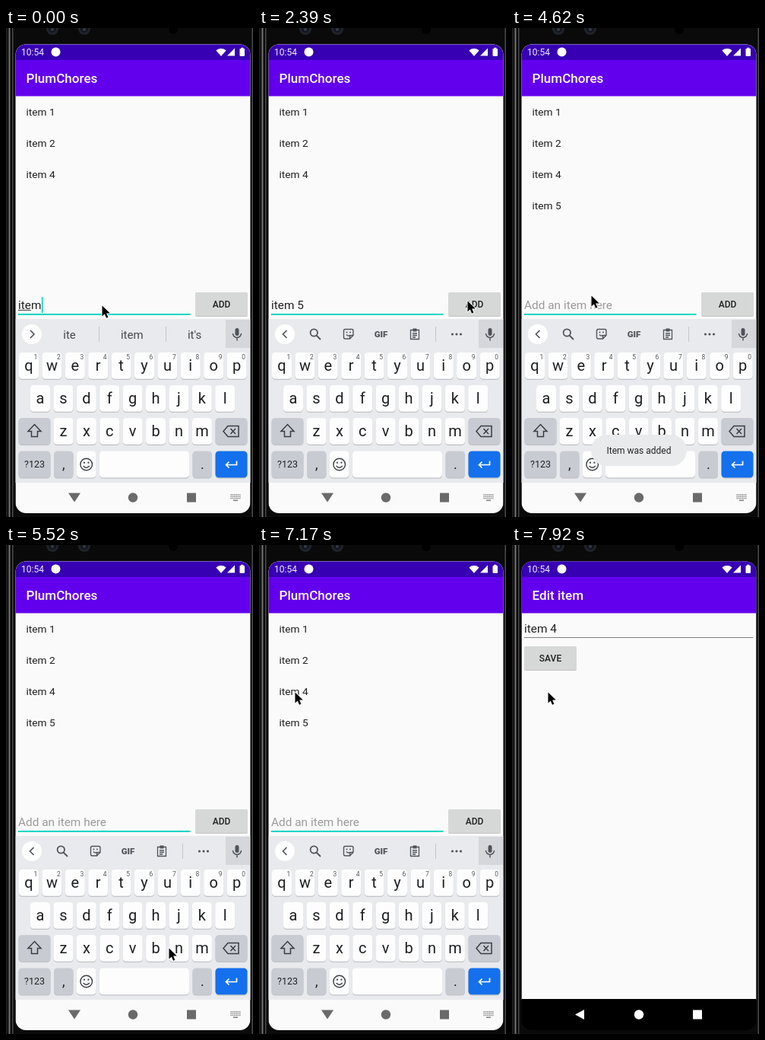
Animation of 325 by 642 pixels, one loop 8 s. Source, as an HTML page with a canvas:

```html
<!DOCTYPE html>
<html lang="en">
<head>
<meta charset="utf-8">
<title>To-do app demo</title>
<style>
html, body { margin: 0; width: 100%; height: 100%; overflow: hidden; background: #0a0a0a; }
canvas { display: block; width: 325px; height: 642px; }
</style>
</head>
<body>
<canvas id="stage"></canvas>
<script>
const W = 325, H = 642, LOOP = 8000;
const dpr = window.devicePixelRatio || 1;
const PURPLE = '#6200ee', DEEP = '#3700b3', PAPER = '#fafafa', TEAL = '#03d5c1', INK = '#212121', ICON = '#50545a';
const LEFT = 12.5, WIDE = 309;

function makeLayer(canvas) {
  canvas.width = W * dpr;
  canvas.height = H * dpr;
  const c = canvas.getContext('2d');
  c.scale(dpr, dpr);
  return c;
}
const screen = makeLayer(document.getElementById('stage'));
const layer = makeLayer(document.createElement('canvas'));
let g = screen;

// Pointer path: time, x, y
const PATH = [
  [1800, 126, 364], [1950, 134, 368], [2100, 190, 370], [2250, 252, 364], [2390, 274, 358],
  [2980, 274, 358], [3130, 268, 400], [3280, 244, 490], [3430, 216, 560], [3580, 202, 586],
  [3880, 200, 589], [4030, 190, 582], [4180, 172, 540], [4330, 142, 455], [4480, 116, 380],
  [4620, 104, 351], [4770, 104, 353], [4920, 112, 372], [5070, 140, 430], [5220, 176, 490],
  [5370, 206, 524], [5520, 214, 529], [5670, 214, 480], [5820, 214, 381], [5970, 219, 300],
  [6120, 150, 190], [6270, 62, 125], [6420, 20, 115], [6570, 8, 140], [6720, 24, 175],
  [6870, 44, 191], [7170, 47, 193]
];

function pointerAt(t) {
  const i = PATH.findIndex(p => p[0] > t);
  if (i === 0) return PATH[0].slice(1);
  if (i < 0) return PATH[PATH.length - 1].slice(1);
  const [t0, x0, y0] = PATH[i - 1], [t1, x1, y1] = PATH[i];
  const k = (t - t0) / (t1 - t0);
  return [x0 + (x1 - x0) * k, y0 + (y1 - y0) * k];
}

function snap(t) {
  const base = t < 2390 ? 0 : t < 2680 ? 2390 : t < 4620 ? 2680 : 4620;
  return base + Math.floor((t - base) / 150) * 150;
}

function rect(x, y, w, h, color) {
  g.fillStyle = color;
  g.fillRect(x, y, w, h);
}
function round(x, y, w, h, r, color) {
  g.fillStyle = color;
  g.beginPath();
  g.roundRect(x, y, w, h, r);
  g.fill();
}
function disc(x, y, r, color) {
  g.fillStyle = color;
  g.beginPath();
  g.arc(x, y, r, 0, 7);
  g.fill();
}
function poly(points, color) {
  g.fillStyle = color;
  g.beginPath();
  points.forEach(([x, y]) => g.lineTo(x, y));
  g.closePath();
  g.fill();
}
function stroke(path, color, width = 1.5) {
  g.strokeStyle = color;
  g.lineWidth = width;
  g.stroke(new Path2D(path));
}
// y is the middle of the capital letters
function text(s, x, y, size, color = INK, align = 'left', weight = 400) {
  g.font = `${weight} ${size}px Roboto, sans-serif`;
  g.textAlign = align;
  g.fillStyle = color;
  g.fillText(s, x, y + size * 0.355);
}
function button(label, x, y, color = '#d6d7d7') {
  round(x, y + 1, 69, 31, 2, '#c4c4c4');
  round(x, y, 69, 31, 2, color);
  text(label, x + 34.5, y + 15.5, 12, INK, 'center', 500);
}
function appBar(title) {
  rect(LEFT, 21, WIDE, 576, PAPER);
  rect(LEFT, 42, WIDE, 47.5, PURPLE);
  rect(LEFT, 21, WIDE, 21, DEEP);
  text(title, 26.5, 66, 17.1, '#fff', 'left', 500);
}

function drawMain(t, shift) {
  appBar('PlumChores');
  const items = ['item 1', 'item 2', 'item 4'];
  if (t >= 2830) items.push('item 5');
  items.forEach((s, i) => text(s, 26.5, 110.5 + 41 * i, 13.7));

  g.save();
  g.translate(0, shift);
  const typed = t < 150 ? 'item' : t < 1650 ? 'item ' : t < 2830 ? 'item 5' : '';
  if (typed) text(typed, 16, 364, 15.4);
  else text('Add an item here', 16, 364, 15.4, '#9a9a9a');
  if (t < 150) rect(16, 370, g.measureText('ite').width, 1, '#444');
  const caret = t < 2390
    ? !(t >= 900 && t < 1350) && t < 2250
    : t < 7620 && (t + 850) % 1000 >= 500;
  if (caret) rect(16.5 + g.measureText(typed).width, 353, 1.6, 21, TEAL);
  rect(16, 375, 226.5, 2, TEAL);
  button('ADD', 249, 347, t >= 2680 && t < 2980 ? '#bfc0c0' : undefined);
  g.restore();
}

function drawEdit() {
  appBar('Edit item');
  text('item 4', 16, 109.5, 15.4);
  rect(16, 121, 301, 1, '#808080');
  button('SAVE', 16, 133);
  rect(LEFT, 596, WIDE, 46, '#000');
}

function key(x, y, w, label = '', color = '#fdfdfd', size = 20) {
  round(x, y + 1, w, 35, 4.5, '#bfc2c7');
  round(x, y, w, 34.8, 4.5, color);
  if (label) text(label, x + w / 2, y + 17, size, '#1e1f21', 'center');
}

function drawStrip(t) {
  const tools = t >= 1950;
  rect(289, 383, 32, 37, '#d5d7db');
  round(301.5, 394, 5, 10, 2.5, ICON);
  stroke('M298.5 401a5.5 5.5 0 0 0 11 0M304 406.5v4', ICON);
  disc(34, 402, 13, '#fff');
  stroke(tools ? 'M36.5 397l-5 5 5 5' : 'M32 397l5 5-5 5', ICON, 1.7);
  if (!tools) {
    const words = t < 300 ? ['ite', 'item', "it's"] : ['is', 'in', 'number'];
    words.forEach((s, i) => text(s, 83.5 + 82.3 * i, 402.5, 15, '#44474b', 'center'));
    rect(122, 392, 1, 20, '#c4c7cb');
    rect(210, 392, 1, 20, '#c4c7cb');
    return;
  }
  stroke('M77 400a4.7 4.7 0 1 1-9.4 0 4.7 4.7 0 0 1 9.4 0M76 404l5 5', ICON, 1.8);
  stroke('M113.500 395.500h8.500q2 0 2 2v6l-4.500 4.500h-6q-2 0-2-2v-8.500q0-2 2-2zM119.500 408v-2.500q0-2 2-2h2.500M115 402.500q2.500 3 4.500 .500', ICON, 1.4);
  disc(115.5, 399.5, 1, ICON);
  disc(120, 399.5, 1, ICON);
  text('GIF', 160.5, 402, 11.5, ICON, 'center', 800);
  stroke('M199.500 396.500h11v12h-11zM202 401h6M202 403.500h6M202 406h4', ICON, 1.3);
  rect(202.5, 394.5, 5, 4, ICON);
  rect(232, 392, 1, 20, '#c4c7cb');
  for (const x of [254.5, 260, 265.5]) disc(x, 402, 1.6, ICON);
}

function drawKeyboard(t) {
  rect(LEFT, 382, WIDE, 215, '#e8eaed');
  drawStrip(t);
  const grey = '#c8ccd2', dark = '#3a3d42', pitch = 30.4;
  const row = (letters, x, y) => [...letters].forEach((c, i) => key(x + pitch * i, y, 26, c));
  row('qwertyuiop', 17, 426);
  for (let i = 0; i < 10; i++) text((i + 1) % 10, 39 + pitch * i, 432, 8.5, '#55585c', 'center');
  row('asdfghjkl', 32, 469);
  row('zxcvbnm', 62.5, 512);

  key(16.5, 512, 42, '', grey);
  stroke('M37.500 520.500l8.500 9h-4.500v7h-8v-7h-4.500z', dark);
  key(275.5, 512, 42, '', grey);
  stroke('M292 522.500h14v14h-14l-6-7zM295.500 526l6.500 7m0-7l-6.500 7', dark);

  key(16.5, 555.5, 42, '?123', grey, 12.5);
  key(63, 555.5, 25.5, ',', grey, 18);
  key(93, 555.5, 25.5);
  stroke('M113.500 573a7.800 7.800 0 1 1-15.600 0 7.800 7.800 0 0 1 15.600 0M101.700 575q4 4.500 8 0', dark, 1.4);
  disc(103, 570.7, 1.1, dark);
  disc(108.4, 570.7, 1.1, dark);
  key(123, 555.5, 118);
  key(245.5, 555.5, 25.5, '.', grey, 18);
  key(275.5, 555.5, 42, '', '#1470ec');
  stroke('M303.500 568.500v5h-14m4-4l-4 4 4 4', '#fff', 1.7);
}

function drawNav(t) {
  const open = t < 7620, done = t >= 7770;
  const color = done ? '#fff' : open ? '#6a6a6a' : '#8b8b8b';
  poly(done ? [[83, 616.5], [95, 610], [95, 623]] : [[82, 610.5], [98, 610.5], [90, 622.5]], color);
  disc(167, 616.5, 6.2, color);
  rect(238, 610.5, 12, 12, color);
  if (!open) return;
  for (let r = 0; r < 3; r++)
    for (let c = 0; c < 6; c++) rect(295.5 + c * 2.3, 612 + r * 2.4, 1.4, 1.4, '#7a7a7a');
  rect(299, 619.5, 6, 1.4, '#7a7a7a');
}

function drawStatus() {
  text('10:54', 20, 31.5, 12, '#f1ecfb');
  disc(65.5, 31.5, 6, '#fff');
  g.fillStyle = '#fff';
  g.beginPath();
  g.moveTo(283, 37);
  g.arc(283, 37, 10, -Math.PI * 0.73, -Math.PI * 0.27);
  g.fill();
  poly([[301, 26.5], [301, 36.5], [291, 36.5]], '#fff');
  round(307.5, 27, 6.5, 10, 1, '#fff');
  rect(309.3, 25.8, 3, 1.5, '#fff');
}

function drawToast(t) {
  const alpha = Math.max(0, Math.min(1, (t - 2680) / 300, (5220 - t) / 300));
  if (!alpha) return;
  g.globalAlpha = alpha;
  round(104, 534, 126, 41, 20.5, '#e8eaeb');
  text('Item was added', 167, 555, 12, '#242424', 'center');
  g.globalAlpha = 1;
}

function drawPhone() {
  rect(0, 0, W, H, '#0a0a0a');
  rect(0, 0, 2, H, '#1c1c1c');
  rect(3, 0, 1, H, '#3c3c3c');
  rect(4, 0, 1.5, H, '#777');
  rect(8, 0, 1.5, H, '#4a4a4a');
  rect(323.5, 0, 1.5, H, '#4a4a4a');
  for (const x of [61, 103]) {
    disc(x, 1, 8, '#20242a');
    disc(x, 1, 5, '#11151b');
    disc(x, 2, 2, '#343b45');
  }
  disc(220, 2, 6, '#000');
}

function drawPointer(x, y) {
  g.save();
  g.translate(x, y);
  const arrow = 'M.500 .500V14.500l3.300-3 2.200 5.200 2.400-1-2.200-5.100h4.600z';
  g.lineJoin = 'round';
  stroke(arrow, '#fff', 2);
  g.fillStyle = '#000';
  g.fill(new Path2D(arrow));
  g.restore();
}

function scaled(scale, cy, draw) {
  g.save();
  g.translate(167, cy);
  g.scale(scale, scale);
  g.translate(-167, -cy);
  draw();
  g.restore();
}

// Opening screen: the list grows away while the form fades in over it.
function drawTransition(t) {
  const first = t < 7770;
  g.save();
  g.beginPath();
  g.rect(LEFT, 21, WIDE, first ? 580 : 576);
  g.clip();
  scaled(first ? 1.021 : 1.04, 309, () => drawMain(t, 213));
  g = layer;
  g.clearRect(0, 0, W, H);
  scaled(first ? 0.909 : 0.985, 338, drawEdit);
  g = screen;
  g.globalAlpha = first ? 0.34 : 0.94;
  g.drawImage(layer.canvas, 0, 0, W, H);
  g.restore();
}

function render(time) {
  const t = snap(time);
  drawPhone();
  g.save();
  g.beginPath();
  g.roundRect(LEFT, 21.5, WIDE, 615.5, 14);
  g.clip();
  rect(LEFT, 21, WIDE, 617, t < 7620 ? PAPER : '#000');
  if (t < 7620) {
    drawMain(t, 0);
    drawKeyboard(t);
  } else if (t < 7920) {
    drawTransition(t);
  } else {
    drawEdit();
  }
  drawNav(t);
  drawStatus();
  drawToast(t);
  g.restore();
  drawPointer(...pointerAt(t));
}

function tick() {
  render(performance.now() % LOOP);
  requestAnimationFrame(tick);
}
tick();
</script>
</body>
</html>
```
